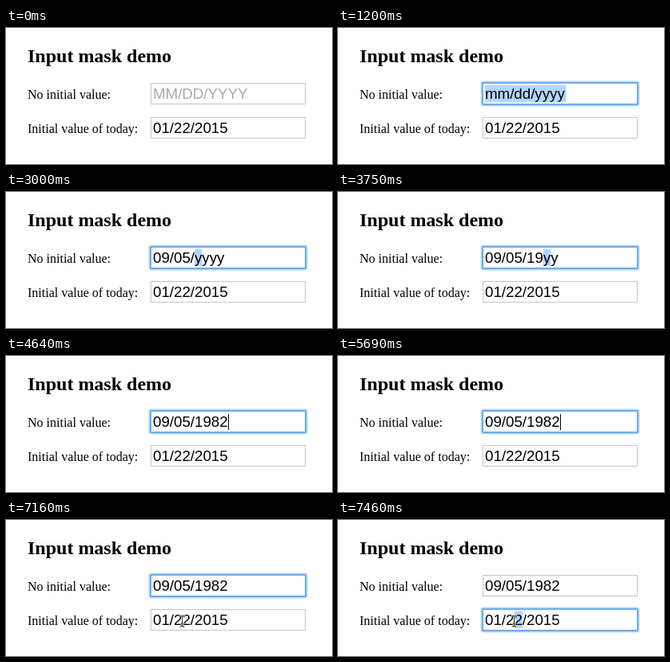
Write an HTML page that moves like this. It is 408 px wide and 171 px high and loops after 8 s.

```html
<!DOCTYPE html>
<html lang="en">
<head>
<meta charset="utf-8">
<title>Input mask demo</title>
<style>
  html, body { margin: 0; overflow: hidden; background: #fff; }
  svg { display: block; width: 408px; height: 171px; }
  text { font: 16px "Liberation Serif", serif; white-space: pre; }
  .head { font-size: 24px; font-weight: bold; }
  .value { font: 18.72px "Liberation Sans", sans-serif; }
  .box { fill: #fff; stroke: #c6c6c6; }
  .ring rect { fill: none; stroke: #5ba4ef; }
  .ring .inner { fill: #fff; stroke: none; }
  #sel { fill: #b4d5fe; }
  #beam { fill: none; stroke-linecap: round; }
</style>
</head>
<body>
<svg viewBox="0 0 408 171">
  <defs>
    <path id="ibeam" d="M-2.5-7Q0-7 0-5Q0-7 2.5-7M0-5V5M-2.5 7Q0 7 0 5Q0 7 2.5 7M-1.5 3H1.5"/>
  </defs>
  <text class="head" x="27" y="43">Input mask demo</text>
  <text x="27" y="89">No initial value:</text>
  <text x="27" y="132">Initial value of today:</text>
  <rect class="box" x="181.5" y="69.5" width="193" height="26"/>
  <rect class="box" x="181.5" y="112.5" width="193" height="26"/>
  <g class="ring" id="ring">
    <rect x="181" y="69" width="194" height="27" rx="1" stroke-width="6" opacity=".2"/>
    <rect x="181" y="69" width="194" height="27" rx="1" stroke-width="4" opacity=".35"/>
    <rect x="181" y="69" width="194" height="27" rx="1" stroke-width="2" opacity=".75"/>
    <rect class="inner" x="182" y="70" width="192" height="25"/>
  </g>
  <rect id="sel" height="21"/>
  <text class="value" id="date" x="184" y="89"></text>
  <text class="value" x="184" y="132">01/22/2015</text>
  <rect id="caret" y="73" width="1" height="20"/>
  <g id="beam">
    <use href="#ibeam" stroke="#fff" stroke-width="2.6" opacity=".8"/>
    <use href="#ibeam" stroke="#333" stroke-width="1.1"/>
  </g>
</svg>
<script>
const LOOP = 8000, SECOND = 7310, ROW = 43;
const $ = id => document.getElementById(id);
const show = (el, on) => el.setAttribute("visibility", on ? "visible" : "hidden");

// time, text of the first field
const typed = [
  [0, "MM/DD/YYYY"], [1200, "mm/dd/yyyy"], [2250, "09/dd/yyyy"],
  [2700, "09/0d/yyyy"], [3000, "09/05/yyyy"], [3750, "09/05/19yy"],
  [4340, "09/05/198y"], [4640, "09/05/1982"]
];
// time, left edge and width of the selection
const selections = [
  [0, 0, 0], [1200, 184, 101.5], [2250, 210, 10.4], [2700, 220.4, 10.4],
  [3000, 236, 9.4], [3750, 256.9, 9.4], [4340, 267.3, 9.4],
  [4640, 0, 0], [7460, 220.6, 10.4]
];
// time, caret position (0 = hidden)
const carets = [
  [0, 0], [4640, 278], [5240, 0], [5690, 278], [6130, 0],
  [6720, 278], [7160, 0], [7310, 221], [7460, 0]
];
// time, centre of the mouse pointer
const pointer = [
  [0, -50, 0], [5830, 347.5, 123], [6130, 294.5, 124], [6280, 215.5, 122.5],
  [6430, 203, 117], [6720, 204, 123], [6870, 206, 127],
  [7020, 216, 128], [7160, 220.5, 127]
];

const at = (list, t) => list.findLast(step => step[0] <= t).slice(1);

function draw(now) {
  const t = now % LOOP;
  const dy = t >= SECOND ? ROW : 0;
  const [text] = at(typed, t), [x, w] = at(selections, t);
  const [cx] = at(carets, t), [px, py] = at(pointer, t);

  $("date").textContent = text;
  $("date").setAttribute("fill", t < 1200 ? "#a9a9a9" : "#000");
  show($("ring"), t >= 1200);
  $("ring").setAttribute("transform", `translate(0 ${dy})`);
  $("sel").setAttribute("x", x);
  $("sel").setAttribute("y", 72 + dy);
  $("sel").setAttribute("width", w);
  show($("caret"), cx);
  $("caret").setAttribute("x", cx);
  $("caret").setAttribute("y", 73 + dy);
  $("beam").setAttribute("transform", `translate(${px} ${py})`);
  requestAnimationFrame(draw);
}

const start = performance.now();
const frame = draw;
frame(0);
draw = (original => now => original(Math.max(0, now - start)))(draw);
</script>
</body>
</html>
```
